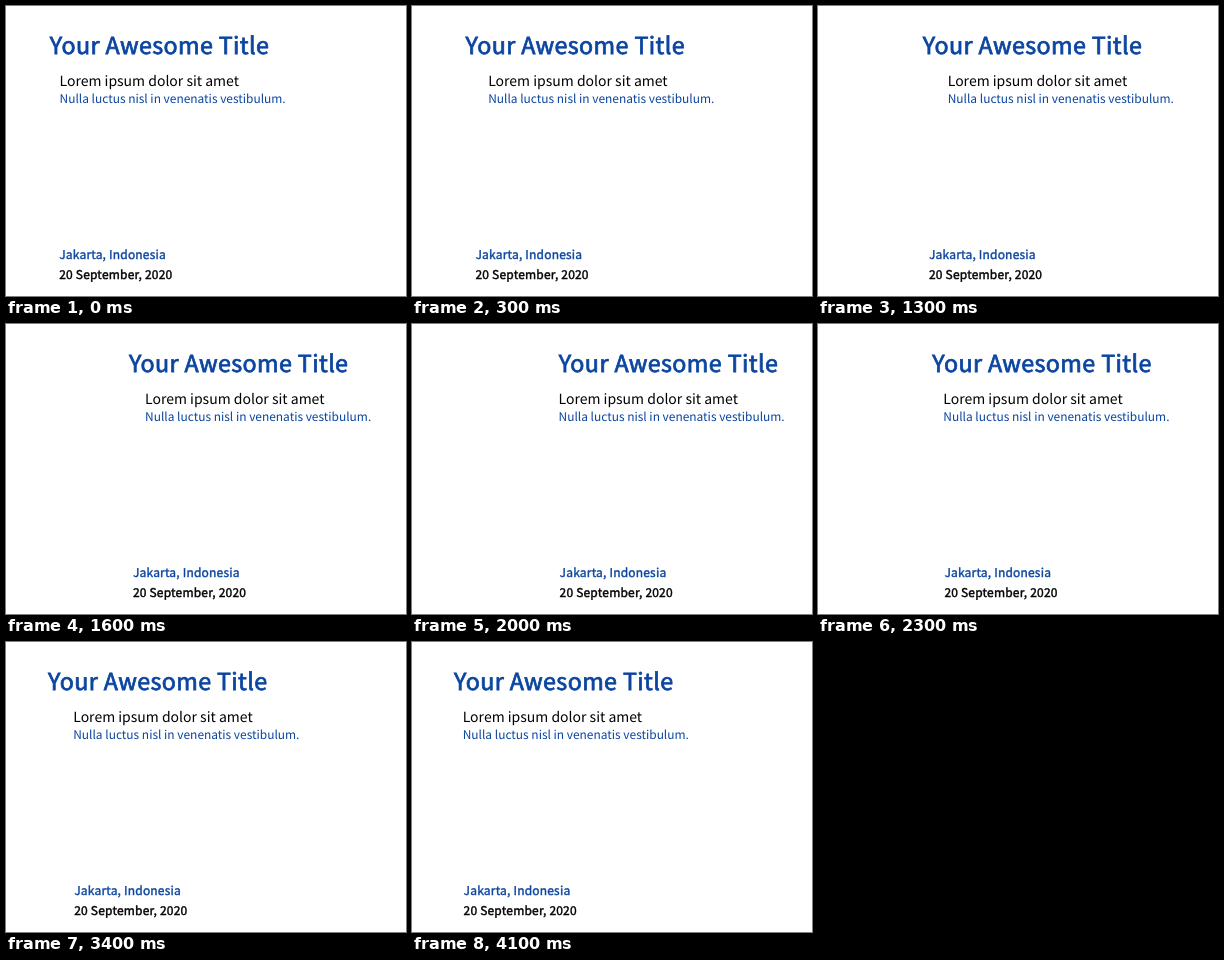
Write an HTML page that moves like this. It is 400 by 290 pixels and loops after 4.8 s.

```html
<!DOCTYPE html>
<html lang="en">
<head>
<meta charset="utf-8">
<style>
html, body { margin: 0; width: 100%; height: 100%; overflow: hidden; background: #fff; }
svg { display: block; }
text {
  font-family: "Noto Sans CJK JP", "Noto Sans CJK SC", "Noto Sans CJK", "Noto Sans", sans-serif;
  font-size: 12px;
  text-rendering: geometricPrecision;
}
.blue { fill: #0b45a0; stroke: #0b45a0; }
text { stroke-width: 0; }
/* Semibold: regular glyphs thickened by a thin outline */
.semibold { stroke-width: .033em; letter-spacing: .016em; }
.black { stroke: #000; }
</style>
</head>
<body>
<svg width="400" height="290">
  <g id="title"><text class="semibold blue" y="48.2" style="font-size:23.3px">Your Awesome Title</text></g>
  <g id="subtitle">
    <text y="79.8" style="font-size:14px">Lorem ipsum dolor sit amet</text>
    <text class="blue" y="97.3" style="font-size:11.95px">Nulla luctus nisl in venenatis vestibulum.</text>
  </g>
  <g id="footer">
    <text class="semibold blue" y="252.6">Jakarta, Indonesia</text>
    <text class="semibold black" y="272.6">20 September, 2020</text>
  </g>
</svg>
<script>
const LOOP = 4800, STEP = 100;
const KEYS = [0, 2000, 3000, 4100];

// x at each key time, with two Bezier handles between neighbouring keys
const paths = {
  title:    [43.8, 61.1, 108.3, 146.7, 112.6, 69.4, 42.2, 42, 42, 42],
  subtitle: [53.5, 107.2, 138.8, 146.5, 122.5, 100, 78.8, 71.4, 51.2, 50.7],
  footer:   [53.2, 73.1, 114.3, 147.6, 123.6, 101, 79.8, 72.4, 52.2, 51.6]
};

function bezier([a, b, c, d], u) {
  const v = 1 - u;
  return v * v * v * a + 3 * v * v * u * b + 3 * v * u * u * c + u * u * u * d;
}

function positionAt(path, time) {
  const t = Math.min(time, KEYS[3]);
  const i = t < KEYS[1] ? 0 : t < KEYS[2] ? 1 : 2;
  const u = (t - KEYS[i]) / (KEYS[i + 1] - KEYS[i]);
  return bezier(path.slice(3 * i), u);
}

function draw() {
  const t = Math.floor(performance.now() % LOOP / STEP) * STEP;
  for (const id in paths)
    document.getElementById(id).setAttribute("transform", `translate(${positionAt(paths[id], t)})`);
  requestAnimationFrame(draw);
}
draw();
</script>
</body>
</html>
```
